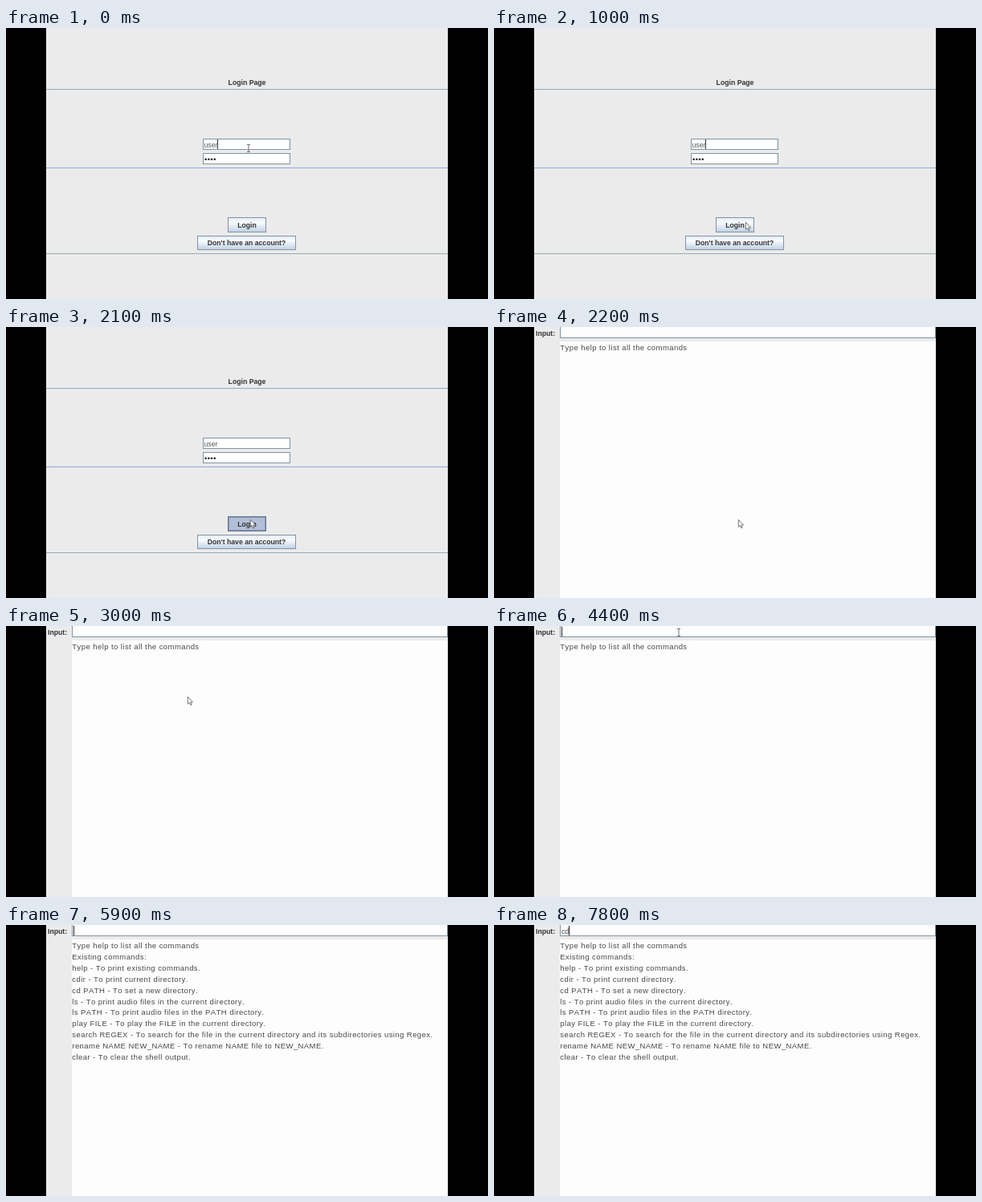
These frames come from a looping animation (600x338 px, 8000 ms). An HTML page with a canvas:

```html
<!DOCTYPE html>
<html lang="en">
<head>
<meta charset="utf-8">
<title>Login and shell</title>
<style>
  html, body { margin: 0; width: 100%; height: 100%; overflow: hidden; background: #000; }
  canvas { display: block; }
</style>
</head>
<body>
<canvas id="stage" width="600" height="338"></canvas>
<script>
const ctx = document.getElementById('stage').getContext('2d');
const LOOP = 8000, STEP = 100;
const PANEL = '#ebebeb', EDGE = '#8493a3', INK = '#333';

const OUTPUT = [
  'Type help to list all the commands',
  'Existing commands:',
  'help - To print existing commands.',
  'cdir - To print current directory.',
  'cd PATH - To set a new directory.',
  'ls - To print audio files in the current directory.',
  'ls PATH - To print audio files in the PATH directory.',
  'play FILE - To play the FILE in the current directory.',
  'search REGEX - To search for the file in the current directory and its subdirectories using Regex.',
  'rename NAME NEW_NAME - To rename NAME file to NEW_NAME.',
  'clear - To clear the shell output.'
];

// Pointer path: [time, x, y]
const POINTER = [
  [0, 302, 150], [100, 301, 152], [200, 313, 242], [1100, 313, 242],
  [1400, 273, 189], [1800, 343, 244], [2000, 304, 240], [2200, 304, 240],
  [2900, 227, 89], [3000, 226, 88], [3400, 226, 88], [4000, 230, 8],
  [4400, 230, 8], [4500, 431, 24]
];
const TYPED = [[0, ''], [5100, 'h'], [5200, 'he'], [5500, 'hel'], [5700, 'help'], [5900, ''], [7800, 'cd']];
// Times at which the caret switches on or off
const LOGIN_CARET = [0, 400, 1000, 1500];
const SHELL_CARET = [3500, 4000, 4400, 6500, 7000, 7500, 7800];

const isOn = (toggles, t) => toggles.filter(at => at <= t).length % 2 === 1;
const latest = (list, t) => list.filter(([at]) => at <= t).pop()[1];

function pointerAt(t) {
  const i = POINTER.findIndex(([at]) => at > t);
  if (i < 0) return POINTER[POINTER.length - 1].slice(1);
  const [t0, x0, y0] = POINTER[i - 1], [t1, x1, y1] = POINTER[i];
  const k = (t - t0) / (t1 - t0), e = k * k * (3 - 2 * k);
  return [Math.round(x0 + (x1 - x0) * e), Math.round(y0 + (y1 - y0) * e)];
}

function rect(x, y, w, h, fill) {
  ctx.fillStyle = fill;
  ctx.fillRect(x, y, w, h);
}

function box(x, y, w, h, fill, stroke = EDGE) {
  rect(x, y, w, h, fill);
  ctx.strokeStyle = stroke;
  ctx.lineWidth = 1;
  ctx.strokeRect(x + .5, y + .5, w - 1, h - 1);
}

function text(str, x, y, { size = 8.7, bold = false, color = INK, align = 'left', spacing = 0 } = {}) {
  ctx.font = `${bold ? 'bold ' : ''}${size}px "Liberation Sans", Arial, sans-serif`;
  ctx.letterSpacing = spacing + 'px';
  ctx.fontKerning = 'none';
  ctx.textAlign = align;
  ctx.fillStyle = color;
  ctx.fillText(str, x, y);
  return ctx.measureText(str).width;
}

function button(label, x, y, w, h, pressed) {
  const g = ctx.createLinearGradient(0, y, 0, y + h);
  g.addColorStop(0, '#dfe9f3');
  g.addColorStop(.35, '#fafcfe');
  g.addColorStop(1, '#bbcfe3');
  box(x, y, w, h, pressed ? '#b2bfd8' : g, pressed ? '#66788c' : EDGE);
  if (pressed) {
    ctx.strokeStyle = '#8296b0';
    ctx.strokeRect(x + 1.5, y + 1.5, w - 3, h - 3);
  }
  text(label, x + w / 2, y + h / 2 + 3.2, { bold: true, align: 'center' });
}

function arrow(x, y) {
  ctx.save();
  ctx.translate(x + .3, y + .3);
  ctx.fillStyle = '#fff';
  ctx.strokeStyle = '#555';
  ctx.lineWidth = .8;
  ctx.fill(new Path2D('M0 0V9L2 7.2L3.6 10.5L4.9 9.9L3.5 6.7H6.2Z'));
  ctx.stroke(new Path2D('M0 0V9L2 7.2L3.6 10.5L4.9 9.9L3.5 6.7H6.2Z'));
  ctx.restore();
}

function beam(x, y) {
  ctx.strokeStyle = '#666';
  ctx.lineWidth = .9;
  ctx.stroke(new Path2D(`M${x - 2} ${y - 4.5}h4m-2 0v9m-2 0h4`));
}

function loginPage(t) {
  rect(50, 0, 500, 338, PANEL);
  rect(50, 76, 500, 1, '#8eabc9');
  rect(50, 174, 500, 1, '#92a5d6');
  rect(50, 281, 500, 1, '#9aabb7');
  text('Login Page', 300, 71, { bold: true, align: 'center' });
  box(245, 138, 109, 14, '#fff');
  box(245, 156, 109, 14, '#fff');
  text('user', 246.5, 149, { color: '#555' });
  ctx.fillStyle = '#222';
  for (let i = 0; i < 4; i++) {
    ctx.beginPath();
    ctx.arc(248.6 + i * 3.7, 163.8, 1.3, 0, 7);
    ctx.fill();
  }
  if (isOn(LOGIN_CARET, t)) rect(263, 139, 1, 12, INK);
  button('Login', 276, 236, 48, 19, t >= 2000);
  button("Don't have an account?", 238, 259, 123, 18);
}

function shellPage(t) {
  rect(50, 0, 500, 338, PANEL);
  rect(82, 18, 468, 320, '#fdfdfd');
  box(82, -2, 468, 16, '#fdfdfd');
  text('Input:', 52, 10.5, { bold: true });
  const w = text(latest(TYPED, t), 84, 10.5, { color: '#555' });
  if (isOn(SHELL_CARET, t)) rect(Math.floor(84 + w), 1, 1, 12, '#222');
  const lines = t < 5900 ? OUTPUT.slice(0, 1) : OUTPUT;
  lines.forEach((line, i) =>
    text(line, 82.3, 29.3 + i * 13.86, { size: 9.5, spacing: .43, color: '#484848' }));
}

function draw(now) {
  const t = Math.floor(now % LOOP / STEP) * STEP;
  rect(0, 0, 600, 338, '#000');
  (t < 2200 ? loginPage : shellPage)(t);
  if (t < 4600) {
    const overField = t < 100 || (t >= 2200 && pointerAt(t)[1] < 14);
    (overField ? beam : arrow)(...pointerAt(t));
  }
}

const start = performance.now();
(function frame() {
  draw(performance.now() - start);
  requestAnimationFrame(frame);
})();
</script>
</body>
</html>
```
